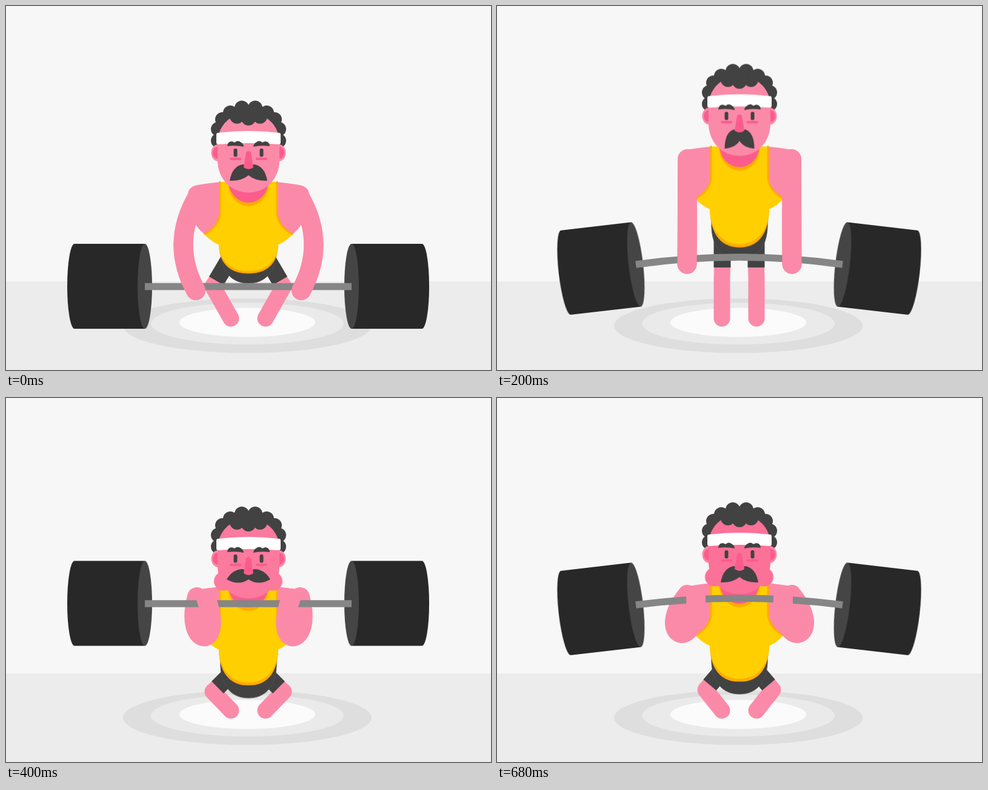
An HTML page without scripts for the animation above (880 ms loop, 800 by 600 pixels).

```html
<!DOCTYPE html>
<html lang="en">
<head>
<meta charset="utf-8">
<title>Weightlifter</title>
<style>
html, body { margin: 0; width: 100%; height: 100%; overflow: hidden; background: #f7f7f7; }
svg { display: block; width: 800px; height: 600px; }

.skin { fill: #fb8aa8; }
.blush { fill: #fc5c8d; }
.dark { fill: #424242; }
.yellow { fill: #ffcf01; }
.orange { fill: #ffab00; }
.line { fill: none; stroke-linecap: round; stroke-linejoin: round; }
.curls { stroke: #424242; stroke-width: 24; }

/* The motion advances every 40 ms: each segment has 2 steps unless it says otherwise. */
.head, .face, .cheek, .tache, .chest, .belly, .pelvis, .shin, .short, .arm, .bar, .plate {
  animation: .88s steps(2) infinite;
}
.head { animation-name: head; }
.face { animation-name: face; }
.cheek { animation-name: cheek; }
.tache { animation-name: tache; }
.chest { animation-name: chest; }
.belly { animation-name: belly; }
.pelvis { animation-name: pelvis; }
.shin { animation-name: shin; stroke: #fb8aa8; stroke-width: 27; }
.short { animation-name: short; stroke: #424242; stroke-width: 28; stroke-linecap: butt; }
.arm { animation-name: arm; stroke: #fb8aa8; stroke-width: 32; }
.fore { stroke-dasharray: 50 100; stroke-dashoffset: -50; }
.bar { animation-name: bar; stroke: #868686; stroke-width: 11.5; stroke-linecap: butt; }
.plate { animation-name: plate; }

@keyframes head {
  0% { transform: none; }
  9.09% { transform: translateY(-28px); animation-timing-function: steps(3); }
  22.72% { transform: translateY(-60.5px); }
  31.81% { transform: translateY(-24px); animation-timing-function: steps(3); }
  45.45% { transform: translateY(23px); }
  54.54% { transform: translateY(18px); }
  63.63% { transform: translateY(13.5px); animation-timing-function: steps(3); }
  77.27%, 100% { transform: translateY(16px); }
}
@keyframes face {
  0%, 22.72% { fill: #fb8aa8; }
  31.81% { fill: #fb86a6; animation-timing-function: steps(3); }
  45.45% { fill: #fb7a9d; }
  54.54%, 100% { fill: #fc7197; }
}
@keyframes cheek {
  0%, 22.72% { transform: translate(368px, 279px) scale(.5); }
  31.81% { transform: translate(359px, 281px) scale(.6); animation-timing-function: steps(3); }
  45.45%, 100% { transform: translate(358.5px, 279px); }
}
@keyframes tache {
  0% { d: path("M400 279Q388 289 369 288Q373 264 391 261L400 266Z"); }
  9.09% { d: path("M400 282Q391 293 373.5 293Q375 267 391 263L400 266Z"); animation-timing-function: steps(3); }
  22.72% { d: path("M400 283Q392 295 375.5 295Q376 268 391 264L400 266Z"); }
  31.81% { d: path("M400 279Q388 289 369 288Q373 264 391 261L400 266Z"); animation-timing-function: steps(3); }
  45.45% { d: path("M400 276Q384 287 364 276Q374 259 391 259L400 265Z"); }
  54.54%, 100% { d: path("M400 279Q388 289 369 288Q373 264 391 261L400 266Z"); }
}
@keyframes chest {
  0% { transform: translateY(290px); }
  9.09% { transform: translateY(263px); animation-timing-function: steps(3); }
  22.72% { transform: translateY(231.5px); }
  31.81% { transform: translateY(266.5px); animation-timing-function: steps(3); }
  45.45% { transform: translateY(311px); }
  54.54% { transform: translateY(306.5px); }
  63.63% { transform: translateY(303px); animation-timing-function: steps(3); }
  77.27%, 100% { transform: translateY(305px); }
}
@keyframes belly {
  0% { transform: translateY(394px) scaleY(.783); }
  9.09% { transform: translateY(367px) scaleY(.867); animation-timing-function: steps(3); }
  22.72% { transform: translateY(335.5px) scaleY(1.04); }
  31.81% { transform: translateY(370.5px) scaleY(1.1); animation-timing-function: steps(3); }
  45.45% { transform: translateY(415px) scaleY(.98); }
  54.54% { transform: translateY(410.5px) scaleY(.99); }
  63.63% { transform: translateY(407px) scaleY(.98); animation-timing-function: steps(3); }
  77.27%, 100% { transform: translateY(409px) scaleY(.98); }
}
@keyframes pelvis {
  0% { transform: translateY(457px); }
  9.09% { transform: translateY(437px); animation-timing-function: steps(3); }
  22.72% { transform: translateY(417px); }
  31.81% { transform: translateY(451px); animation-timing-function: steps(3); }
  45.45% { transform: translateY(494.5px); }
  54.54% { transform: translateY(490px); }
  63.63% { transform: translateY(486px); animation-timing-function: steps(3); }
  77.27%, 100% { transform: translateY(488px); }
}
@keyframes shin {
  0% { d: path("M371 515L341 462L347 453"); }
  9.09% { d: path("M371 515L359 459L363 441"); animation-timing-function: steps(3); }
  22.72% { d: path("M371 515L371 450L371.5 431"); }
  31.81% { d: path("M371 515L362 461L364 452"); animation-timing-function: steps(3); }
  45.45% { d: path("M371 515L341 484L349 477"); }
  54.54% { d: path("M371 515L343.5 482L351 474"); animation-timing-function: steps(5); }
  77.27%, 100% { d: path("M371 515L344 481L351 473"); }
}
@keyframes short {
  0% { d: path("M347 453L370 414"); }
  9.09% { d: path("M363 441L371 402"); animation-timing-function: steps(3); }
  22.72% { d: path("M371.5 431L371.5 375"); }
  31.81% { d: path("M364 452L372 410"); animation-timing-function: steps(3); }
  45.45% { d: path("M349 477L374 452"); }
  54.54% { d: path("M351 474L374 447"); animation-timing-function: steps(5); }
  77.27%, 100% { d: path("M351 473L374 446"); }
}
@keyframes arm {
  0% { d: path("M317 312C285.7 364 284.3 416 313 469"); }
  9.09% { d: path("M315 285C299.7 338 299 393 313 449"); animation-timing-function: steps(3); }
  22.72% { d: path("M314 252C314 312 314 368 313.5 425.5"); }
  31.81% { d: path("M312 290C255 305 250 375 320 383"); animation-timing-function: steps(3); }
  45.45% { d: path("M315 328C292 412 362 417 330 330"); }
  54.54% { d: path("M314 325C266 400 333 420 328 330"); animation-timing-function: steps(5); }
  77.27%, 100% { d: path("M314 324C258 393 332 422 328 328"); }
}
@keyframes bar {
  0% { d: path("M229 462.5Q399.5 462.5 570 462.5"); }
  9.09% { d: path("M229 446Q399.5 434 570 446"); animation-timing-function: steps(3); }
  22.72% { d: path("M229 426Q399.5 402 570 426"); }
  31.81% { d: path("M229 387Q399.5 373 570 387"); animation-timing-function: steps(3); }
  45.45% { d: path("M229 339Q399.5 339 570 339"); }
  54.54% { d: path("M229 342Q399.5 333 570 342"); }
  63.63% { d: path("M229 340Q399.5 322 570 340"); animation-timing-function: steps(3); }
  77.27%, 100% { d: path("M229 341Q399.5 319 570 341"); }
}
@keyframes plate {
  0% { transform: translate(229px, 462px) rotate(0deg); }
  9.09% { transform: translate(229px, 445.5px) rotate(-3.3deg); animation-timing-function: steps(3); }
  22.72% { transform: translate(229px, 426px) rotate(-6.6deg); }
  31.81% { transform: translate(229px, 386.5px) rotate(-4deg); animation-timing-function: steps(3); }
  45.45% { transform: translate(229px, 338.5px) rotate(0deg); }
  54.54% { transform: translate(229px, 341.5px) rotate(-3.2deg); }
  63.63% { transform: translate(229px, 340px) rotate(-5.8deg); animation-timing-function: steps(3); }
  77.27%, 100% { transform: translate(229px, 341px) rotate(-6.6deg); }
}
</style>
</head>
<body>
<svg viewBox="0 0 800 600">
  <rect width="800" height="600" fill="#f7f7f7"/>
  <rect y="454" width="800" height="146" fill="#ececec"/>
  <ellipse cx="398" cy="527" rx="205" ry="45" fill="#dedede"/>
  <ellipse cx="398" cy="523.5" rx="159" ry="34.5" fill="#eaeaea"/>
  <ellipse cx="398" cy="521.5" rx="112" ry="24" fill="#fbfbfb"/>

  <!-- Legs -->
  <path class="line shin"/>
  <path class="line short"/>
  <g transform="matrix(-1 0 0 1 799 0)">
    <path class="line shin"/>
    <path class="line short"/>
  </g>
  <path class="pelvis dark" stroke="#505050" d="M354-62C352-20 372 0 400 0S448-20 446-62Z"/>

  <!-- Torso -->
  <g class="belly">
    <path class="orange" d="M351-6V0C352 42 372 60 400 60S448 42 449 0V-6Z"/>
    <path class="yellow" d="M351-6V0C353 37 374 55 400 55S447 37 449 0V-6Z"/>
  </g>
  <g class="chest">
    <path class="skin" d="M355 0Q325 3 312 6Q299 10 300 24L302 46Q308 70 327 86L400 100L473 86Q492 70 498 46L500 24Q501 10 488 6Q475 3 445 0Z"/>
    <path class="yellow" d="M352 0V52Q350 72 327 86Q338 98 352 104H448Q462 98 473 86Q450 72 448 52V0Z"/>
    <path class="line" stroke="#ffab00" stroke-width="3" stroke-linecap="butt" d="M353 0V52Q351 73 328 86M447 0V52Q449 73 472 86"/>
    <ellipse class="orange" cx="400" rx="34" ry="40"/>
    <ellipse class="blush" cx="400" rx="32.5" ry="34"/>
  </g>

  <path class="line arm"/>
  <g transform="matrix(-1 0 0 1 800 0)"><path class="line arm"/></g>

  <!-- Head -->
  <g class="head">
    <ellipse class="dark" cx="400" cy="213" rx="50" ry="46"/>
    <path class="line curls" d="M350 222h0M350 203h0M357 187h0M370 176h0M389 168h0M411 168h0M430 176h0M443 187h0M450 203h0M450 222h0"/>
    <ellipse class="skin" cx="350" cy="242" rx="11.5" ry="14"/>
    <ellipse class="skin" cx="450" cy="242" rx="11.5" ry="14"/>
    <ellipse class="blush" cx="349" cy="242" rx="8" ry="10"/>
    <ellipse class="blush" cx="451" cy="242" rx="8" ry="10"/>
    <g class="face">
      <path d="M349 225V254C349 286 372 307.500 400 307.500S451 286 451 254V225C451 198 430 176 400 176S349 198 349 225Z"/>
      <circle class="cheek" r="15.5"/>
      <g transform="matrix(-1 0 0 1 799 0)"><circle class="cheek" r="15.5"/></g>
    </g>
    <path class="line curls" d="M381 182h0M400 185h0M419 182h0"/>
    <path fill="#fff" d="M350 209Q400 203 450 209Q453 209 453 212V225Q453 228 450 228Q400 224 350 228Q347 228 347 225V212Q347 209 350 209Z"/>
    <path class="dark" d="M365 231Q366 222 374 223.500L377 225Q382 220 388 225Q392 228 392 232Q380 229 365 231ZM435 231Q434 222 426 223.500L423 225Q418 220 412 225Q408 228 408 232Q420 229 435 231Z"/>
    <rect class="dark" x="375.500" y="235" width="6" height="13.500" rx="2.500"/>
    <rect class="dark" x="418.500" y="235" width="6" height="13.500" rx="2.500"/>
    <rect class="blush" x="369.500" y="250" width="18.500" height="4" rx="1"/>
    <rect class="blush" x="412" y="250" width="18.500" height="4" rx="1"/>
    <path class="tache dark"/>
    <g transform="matrix(-1 0 0 1 800 0)"><path class="tache dark"/></g>
    <path class="blush" d="M396 241Q400 237 404 241L408 266Q400 272 392 266Z"/>
  </g>

  <!-- Barbell -->
  <g class="plate">
    <path fill="#282828" d="M0-70H-116A12 70 0 0 0-116 70H0Z"/>
    <ellipse rx="12" ry="70" fill="#454545"/>
  </g>
  <g transform="matrix(-1 0 0 1 799 0)">
    <g class="plate">
      <path fill="#282828" d="M0-70H-116A12 70 0 0 0-116 70H0Z"/>
      <ellipse rx="12" ry="70" fill="#454545"/>
    </g>
  </g>
  <path class="line bar"/>

  <!-- Forearms grip over the bar -->
  <path class="line arm fore" pathLength="100"/>
  <g transform="matrix(-1 0 0 1 800 0)"><path class="line arm fore" pathLength="100"/></g>
</svg>
</body>
</html>
```
